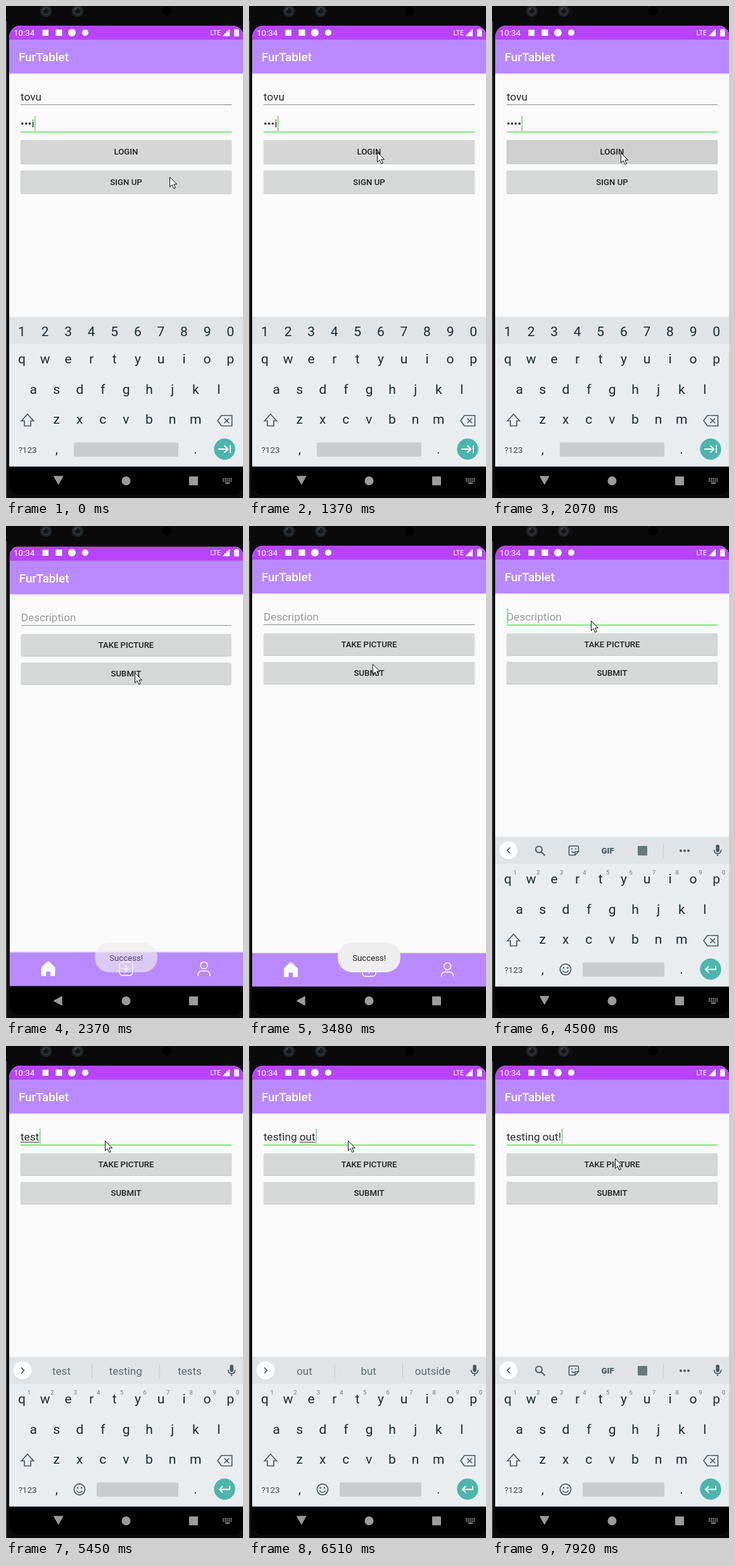
An HTML page for the animation above (8 s loop, 374 by 775 pixels).

```html
<!DOCTYPE html>
<html lang="en">
<head>
<meta charset="utf-8">
<title>Pet app demo</title>
<style>
html, body { margin: 0; width: 100%; height: 100%; overflow: hidden; background: #0a0a0b; }
svg { display: block; width: 374px; height: 775px; font-family: Roboto, sans-serif; }
text { white-space: pre; }
</style>
</head>
<body>
<svg id="stage" viewBox="0 0 374 775" xmlns="http://www.w3.org/2000/svg"></svg>
<script>
const LOOP = 8000;
const PURPLE = '#b98aff', DEEP = '#b843fb', GREEN = '#84e582', INK = '#1c2a30', ICON = '#4b5a61';
const FIELD = 17.2;
const stage = document.getElementById('stage');
const pen = document.createElement('canvas').getContext('2d');

const ticks = [0, 590, 710, 830, 950, 1100, 1250, 1370, 1520, 1830, 1950, 2070, 2220, 2370, 2490,
  3480, 3600, 3720, 3840, 3990, 4110, 4230, 4380, 4500, 4780, 5150, 5300, 5450, 5570, 5690, 5810,
  5960, 6240, 6360, 6510, 6940, 7370, 7650, 7770, 7920];

const pointer = [[0, 258, 269], [470, 258, 269], [950, 211, 232], [1100, 202, 222], [1250, 201, 213],
  [1370, 202, 230], [1520, 203, 231], [3360, 203, 231], [3840, 170, 176], [4230, 153, 144],
  [4500, 156, 149], [7530, 156, 149], [7770, 190, 170], [7920, 194, 177]];

// time, committed text, text being composed, suggestions
const typing = [
  [0, '', '', null],
  [5150, '', 't', ['the', 'to', 'this']],
  [5300, '', 'te', ['test', 'tell', 'texts']],
  [5450, '', 'test', ['test', 'testing', 'tests']],
  [5570, '', 'testi', ['testing', 'test', 'testimony']],
  [5690, '', 'testin', ['testing', 'tests', 'test']],
  [5810, '', 'testing', ['testing', 'tests', 'test']],
  [5960, 'testing ', '', ['the', 'it', 'in']],
  [6240, 'testing ', 'o', ['on', 'of', 'or']],
  [6360, 'testing ', 'ou', ['our', 'out', 'of']],
  [6510, 'testing ', 'out', ['out', 'but', 'outside']],
  [6940, 'testing out!', '', null]
];

const within = (t, a, b) => t >= a && t < b;
const last = (list, t, key) => list.filter(e => key(e) <= t).pop();

function mix(keys, t) {
  const i = keys.findIndex(k => k[0] > t);
  if (i < 0) return keys[keys.length - 1].slice(1);
  const a = keys[i - 1], b = keys[i], p = (t - a[0]) / (b[0] - a[0]);
  return a.slice(1).map((v, n) => v + (b[n + 1] - v) * p);
}

function width(s) {
  pen.font = FIELD + 'px Roboto, sans-serif';
  return pen.measureText(s).width;
}

const rect = (x, y, w, h, fill, r = 0) =>
  `<rect x="${x}" y="${y}" width="${w}" height="${h}" rx="${r}" fill="${fill}"/>`;
const disc = (x, y, r, fill) => `<circle cx="${x}" cy="${y}" r="${r}" fill="${fill}"/>`;
const shape = (d, fill) => `<path d="${d}" fill="${fill}"/>`;
const line = (d, color, w = 1.7) =>
  `<path d="${d}" fill="none" stroke="${color}" stroke-width="${w}"/>`;
const ring = (x, y, r, color, w = 1.7) =>
  `<circle cx="${x}" cy="${y}" r="${r}" fill="none" stroke="${color}" stroke-width="${w}"/>`;
const text = (s, x, y, size, fill, anchor = 'start', weight = 400) =>
  `<text x="${x}" y="${y}" font-size="${size}" fill="${fill}" text-anchor="${anchor}" font-weight="${weight}">${s}</text>`;
const mid = (s, x, y, size, fill, weight) => text(s, x, y, size, fill, 'middle', weight);

function button(label, y, h, fill = '#d6d7d7') {
  return rect(22.5, y + .5, 334, h + 1, '#e3e3e3', 2.5) + rect(23, y + 1, 333, h, '#c9caca', 2) +
    rect(23, y, 333, h, fill, 2) + mid(label, 189.5, y + h / 2 + 4.9, 13.2, '#1f1f1f', 500);
}

function caret(x, y) {
  return rect(x, y, 2, 24, GREEN);
}

function appBar() {
  return rect(5, 31, 370, 695, '#fafafa') + rect(5, 106, 370, 1, '#d9d5de') +
    rect(5, 107, 370, 1.5, '#f0eff1') + rect(5, 31, 370, 23, DEEP) + rect(5, 53, 370, 53, PURPLE) +
    text('FurTablet', 20, 87, 18.8, '#fff', 'start', 500);
}

function login(t) {
  const secret = t < 1520 ? '•••i' : '••••';
  const caretOn = t < 590 || within(t, 1100, 1520) || t >= 2070;
  const shade = Math.round(214 - 7 * Math.min(1, Math.max(0, (t - 1710) / 360)));
  return appBar() + text('tovu', 23, 149, FIELD, '#2a2a2a') + rect(23, 155, 333, 1, '#858585') +
    text(secret, 23, 191, FIELD, '#2a2a2a') + rect(23, 197.5, 333, 2, GREEN) +
    (caretOn ? caret(23.2 + width(secret), 173) : '') +
    button('LOGIN', 211, 37, `rgb(${shade},${shade},${shade})`) + button('SIGN UP', 259, 36);
}

function tabs() {
  return rect(5, 671.5, 370, 1.5, '#e6e2ea') + rect(5, 673, 370, 53, PURPLE) +
    shape('M66 687 Q67 687 68 688 L77 697 V709 Q77 710.5 75.5 710.5 H69.5 V703.5 H62.5 V710.5 H56.5 Q55 710.5 55 709 V697 L64 688 Q65 687 66 687Z', '#fff') +
    '<rect x="179" y="688.5" width="21" height="21" rx="5" fill="none" stroke="#fff" stroke-width="1.5"/>' +
    line('M189.5 693 V705 M183.5 699 H195.5', '#fff', 1.5) +
    ring(313, 693.5, 5.5, '#fff', 1.5) +
    line('M303.5 710.5 V709 Q303.5 702.5 310 702.5 H316 Q322.500 702.5 322.5 709 V710.5', '#fff', 1.5);
}

function post(t, entry) {
  const [, done, draft] = entry, all = done + draft;
  const focus = t >= 4110;
  const caretOn = focus && !within(t, 4780, 5150) && !within(t, 7370, 7920);
  const x = 23 + width(done);
  return appBar() +
    (all ? text(all, 23, 149, FIELD, '#2a2a2a') : text('Description', 23, 149, FIELD, '#9b9b9b')) +
    (draft ? rect(x, 151, width(draft), 1, '#3c3c3c') : '') +
    (focus ? rect(23, 155, 333, 2, GREEN) : rect(23, 155, 333, 1, '#858585')) +
    (caretOn ? caret(23.5 + width(all), 130) : '') +
    button('TAKE PICTURE', 169, 34.5) + button('SUBMIT', 214, 34.5) + tabs();
}

function toast(alpha) {
  return `<g opacity="${alpha}">` + rect(140, 656, 99, 47, '#eee', 23) +
    mid('Success!', 189.7, 685, 13.2, '#1d1d1d') + '</g>';
}

function mic() {
  return rect(353.3, 502, 5.6, 11.5, ICON, 2.8) + line('M350.500 510 Q350.5 516 356 516 Q361.5 516 361.5 510 M356 516 V520', ICON, 1.7);
}

function strip(words) {
  let s = disc(26, 512, 14.7, '#cfd4d7') + disc(26, 511, 14.5, '#fdfdfd') + mic();
  if (words) {
    s += line('M24 506.500 L28.500 511 L24 515.500', ICON) + rect(135, 500, 1, 23, '#c3c8cb') + rect(242, 500, 1, 23, '#c3c8cb');
    return s + words.map((w, i) => mid(w, 87.5 + i * 101.2, 518, 17, '#5d696f')).join('');
  }
  s += line('M28.500 506.500 L24 511 L28.500 515.500', ICON);
  s += ring(74, 509.5, 5, ICON, 1.9) + line('M77.500 513 L83.500 519', ICON, 2.1);
  s += line('M123.500 504 H134.500 Q136.500 504 136.500 506 V513 L131 518.500 H123.500 Q121.500 518.500 121.500 516.500 V506 Q121.500 504 123.500 504 M131 518 V513 H136.500 M125.500 512.500 Q127.500 515 129.500 513.500', ICON, 1.6);
  s += disc(126, 508.5, 1.1, ICON) + disc(132, 508.5, 1.1, ICON);
  s += mid('GIF', 182.5, 515.8, 13.2, ICON, 900) + rect(230, 504, 15, 15, '#69767c', 1);
  s += rect(270, 501, 1, 21, '#c3c8cb');
  return s + [298, 304, 310].map(x => disc(x, 511.5, 2, ICON)).join('');
}

function keyRow(keys, x, y) {
  return [...keys].map((k, i) => mid(k, x + i * 36.57, y, 21, INK)).join('');
}

function keyboard(words, plain) {
  let s = rect(5, 489, 370, 1, '#eef0f1') + rect(5, 490, 370, 236, '#e9edf0') + rect(5, 490, 370, 42, '#e0e4e7');
  s += plain ? keyRow('1234567890', 25, 519.7) : strip(words);
  s += keyRow('qwertyuiop', 25, 563) + keyRow('asdfghjkl', 43.3, 610.5) + keyRow('zxcvbnm', 79.7, 657.5);
  if (!plain) {
    s += [...'1234567890'].map((k, i) => mid(k, 36.3 + i * 36.57, 548.5, 9.5, '#6c777d')).join('');
    s += ring(116, 698.5, 8.6, ICON) + disc(113, 696, 1.3, ICON) + disc(119, 696, 1.3, ICON) +
      line('M111.500 700.500 Q116 706.500 120.500 700.500', ICON, 1.5);
  }
  s += line('M34 643 L43.500 653.500 H39 V661.500 H29 V653.500 H24.500 Z', ICON);
  s += line('M340 645 H356.500 V661.500 H340 L334 653.200 Z M344.500 649.500 L352 657 M352 649.500 L344.500 657', ICON);
  s += mid('?123', 34, 703.5, 13.5, '#3d4a50') + mid(',', 80, 704.5, 20, INK) + mid('.', 299, 704.5, 20, INK);
  const left = plain ? 107 : 143;
  s += rect(left, 687.5, 272 - left, 22.5, '#c8cccf', 2.5) + disc(345, 698, 16.7, '#4db6ac');
  return s + line(plain
    ? 'M335 698 H350 M344.500 692.500 L350 698 L344.500 703.500 M354 692 V704'
    : 'M353 693 V698.500 H337 M342 693.500 L337 698.500 L342 703.500', '#fff', 2);
}

function statusIcons() {
  return text('10:34', 12, 47, 13.3, '#fff') + rect(57.5, 37.5, 9.5, 9.5, '#fff') +
    rect(78.5, 37, 10, 10, '#fff') + disc(104, 42, 6, '#fff') + disc(125, 42, 5, '#fff') +
    text('LTE', 322.5, 46, 10.5, '#fff') + shape('M353 36 V47.500 H341.500 Z', '#fff') +
    shape('M360 37.200 H362 V36 H365.500 V37.200 H367.500 V48 H360 Z', '#fff');
}

function navBar(typingMode) {
  const gray = '#9b9b9b';
  const back = typingMode ? 'M76 741 H89.500 L82.800 753 Z' : 'M88 741.500 V754.500 L76 748 Z';
  let s = rect(5, 725.5, 370, 45, '#000') +
    `<path d="${back}" fill="${gray}" stroke="${gray}" stroke-width="1.5" stroke-linejoin="round"/>` +
    disc(189.5, 748, 7, gray) + rect(289, 741, 14, 14, gray, 1);
  if (typingMode) {
    for (let i = 0; i < 10; i++) s += rect(342 + (i % 5) * 3.1, 744 + (i > 4) * 3.2, 2, 2, gray);
    s += rect(346, 750.5, 7, 2, gray);
  }
  return s;
}

function bezel() {
  let s = rect(0, 0, 374, 775, '#0a0a0b') + rect(0, 24, 1.3, 751, '#4a4a4c');
  for (const x of [63, 113]) {
    s += disc(x, 8, 9.5, '#1d2124') + ring(x, 8, 6, '#30373c', 1.5) +
      disc(x, 8, 3, '#111416') + disc(x - 3, 5, 1.3, '#4b555c');
  }
  return s + disc(254, 8, 7, '#000');
}

function mouse(x, y) {
  return `<path transform="translate(${x.toFixed(1)} ${y.toFixed(1)})" d="M.500 .500 V16 L4.200 12.600 L6.800 18.500 L9.300 17.400 L6.800 11.700 H11.600 Z" fill="#fff" stroke="#111" stroke-width="1"/>`;
}

function scene(t) {
  const entry = last(typing, t, e => e[0]);
  const onLogin = t < 2220, typingMode = onLogin || t >= 4380;
  const [size, fade] = mix([[0, .965, .75], [2220, .965, .75], [2370, .995, 1], [2490, 1, 1]], t);
  const [shown] = mix([[0, 0], [2220, 0], [2370, .64], [2490, 1], [3990, 1], [4110, .9], [4230, .64], [4380, 0]], t);
  let s = bezel() + '<clipPath id="glass"><rect x="5" y="31" width="370" height="739" rx="18"/></clipPath><g clip-path="url(#glass)">';
  if (t < 2370) s += login(t);
  if (!onLogin) {
    s += `<g opacity="${fade}" transform="translate(190 390) scale(${size}) translate(-190 -390)">${post(t, entry)}</g>`;
  }
  if (shown > 0) s += toast(shown);
  if (typingMode) {
    const rising = within(t, 4380, 4500);
    s += `<g transform="translate(0 ${rising ? 60 : 0})" opacity="${rising ? .85 : 1}">${keyboard(entry[3], onLogin)}</g>`;
  }
  s += navBar(typingMode) + statusIcons() + '</g>';
  return s + mouse(...mix(pointer, t));
}

let drawn = -1;
const start = performance.now();
function frame(now) {
  const t = last(ticks, Math.max(0, now - start) % LOOP, k => k);
  if (t !== drawn) {
    stage.innerHTML = scene(t);
    drawn = t;
  }
  requestAnimationFrame(frame);
}
frame(start);
</script>
</body>
</html>
```
